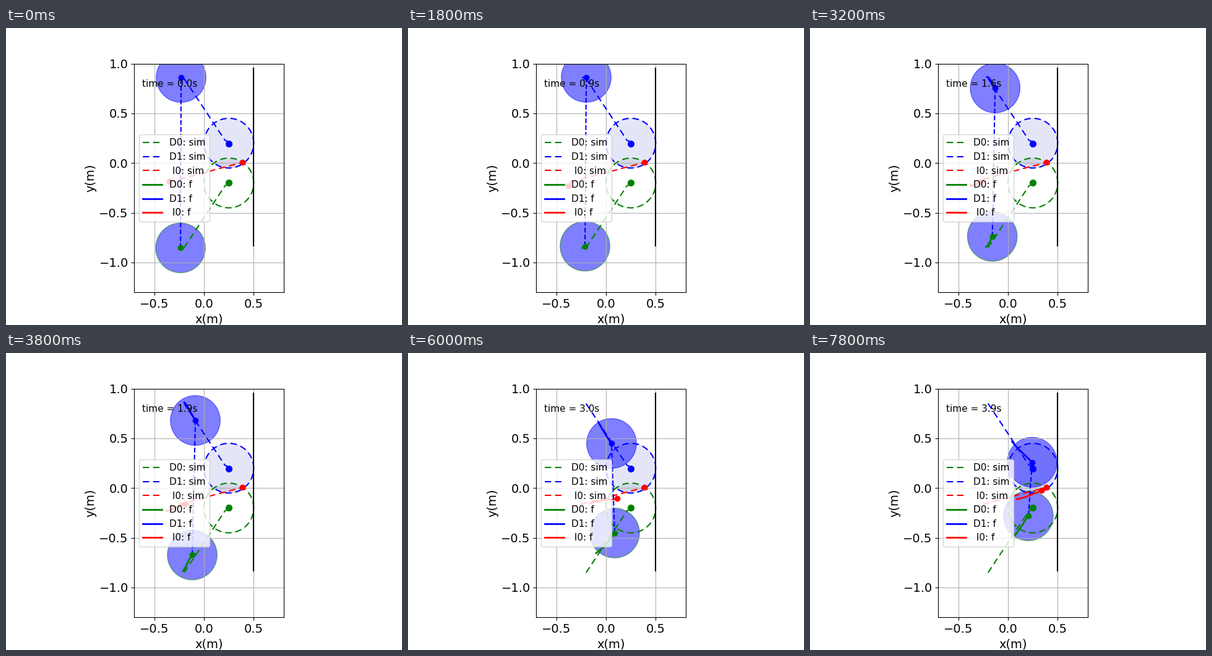
These frames come from a looping animation (640x480 px, 8000 ms). A matplotlib script:

```python
import numpy as np
import matplotlib.pyplot as plt
from matplotlib.animation import FuncAnimation
from matplotlib.patches import Circle

FRAMES, INTERVAL, STEP = 40, 200, 0.1
RADIUS, TAIL = 0.25, 10
DASH = (0, (5, 3))
LABELS = {"green": "D0", "blue": "D1", "red": " I0"}
SIDES = {"green": -1, "blue": 1}

# poses of the discs and the object at a few shared steps
KEY_STEPS = np.array([0, 13, 19, 24, 30, 39])
KEY_POSES = {
    "green": [(-.236, -.853), (-.186, -.797), (-.118, -.673),
              (-.014, -.583), (.087, -.452), (.205, -.279)],
    "blue": [(-.230, .861), (-.168, .823), (-.087, .680),
             (-.023, .570), (.056, .449), (.243, .260)],
    "red": [(-.348, -.185), (-.342, -.222), (-.187, -.160),
            (-.031, -.123), (.114, -.107), (.339, -.025)],
}


def smooth_path(poses):
    """Cubic Hermite curve through the key poses, one row per step."""
    p, t = np.array(poses), KEY_STEPS
    m = np.gradient(p, t, axis=0)
    steps = np.arange(FRAMES)
    i = np.clip(np.searchsorted(t, steps, side="right") - 1, 0, len(t) - 2)
    h = (t[i + 1] - t[i])[:, None]
    u = (steps - t[i])[:, None] / h
    ease = u * u * (3 - 2 * u)
    return (p[i] + ease * (p[i + 1] - p[i])
            + h * u * (1 - u) * ((1 - u) * m[i] - u * m[i + 1]))


def plan(color):
    """Planned route: the two discs mirror each other about y = 0."""
    if color == "red":
        return np.array([(-.35, -.19), (.386, .007)])
    route = [(-.2, .85), (.212, .228), (.235, .22), (.25, .196)]
    return np.array(route) * (1, SIDES[color])


paths = {c: smooth_path(p) for c, p in KEY_POSES.items()}

fig, ax = plt.subplots(figsize=(6.4, 4.8), dpi=100)
ax.set_aspect("equal")
ax.set_xlim(-0.7, 0.8)
ax.set_ylim(-1.3, 1.0)
ax.set_xticks(np.arange(-0.5, 0.6, 0.5))
ax.set_yticks(np.arange(-1, 1.1, 0.5))
ax.tick_params(labelsize=14)
ax.set_xlabel("x(m)", fontsize=14)
ax.set_ylabel("y(m)", fontsize=14, labelpad=3)
ax.grid(True)

# goal discs and their overlap
upper = Circle((0.25, 0.2), RADIUS, fc="#e4e6f8", ec="#dcdff2", lw=1)
lower = Circle((0.25, -0.2), RADIUS, fc="none", ec="#e2ece2", lw=1)
lens = Circle((0.25, -0.2), RADIUS, fc="#d4d6e8", ec="none")
for patch in (upper, lower, lens):
    ax.add_patch(patch)
lens.set_clip_path(upper)

angle = np.linspace(0, 2 * np.pi, 200)
for color, side in SIDES.items():
    ax.plot(0.25 + RADIUS * np.cos(angle), 0.2 * side + RADIUS * np.sin(angle),
            color=color, lw=1.5, ls=DASH)

ax.plot([0.5, 0.5], [-0.83, 0.955], color="black", lw=1.5)

for color, label in LABELS.items():
    route = plan(color)
    ax.plot(*route.T, color=color, lw=1.5, ls=DASH, label=label + ": sim")
    ax.plot(*route[-1], "o", color=color, ms=7 if color in SIDES else 6)

discs = {c: ax.add_patch(Circle((0, 0), RADIUS, fc="blue", ec=c, alpha=0.5))
         for c in SIDES}
link, = ax.plot([], [], "--", color="blue", lw=1.5)
tails, dots = {}, {}
for color, label in LABELS.items():
    tails[color], = ax.plot([], [], color=color, lw=2, label=label + ": f")
    dots[color], = ax.plot([], [], "o", color=color, ms=6)

clock = ax.text(0.05, 0.9, "", transform=ax.transAxes, fontsize=11)
ax.legend(loc="center left", fontsize=11)


def update(k):
    for color, path in paths.items():
        tails[color].set_data(*path[max(0, k - TAIL):k + 1].T)
        dots[color].set_data(*path[k:k + 1].T)
    for color, disc in discs.items():
        disc.center = paths[color][k]
    link.set_data(*np.array([paths[c][k] for c in SIDES]).T)
    clock.set_text(f"time = {k * STEP:.1f}s")
    return [*tails.values(), *dots.values(), *discs.values(), link, clock]


anim = FuncAnimation(fig, update, frames=FRAMES, interval=INTERVAL,
                     init_func=lambda: update(0), repeat=True,
                     repeat_delay=0, blit=False)
plt.show()
```
